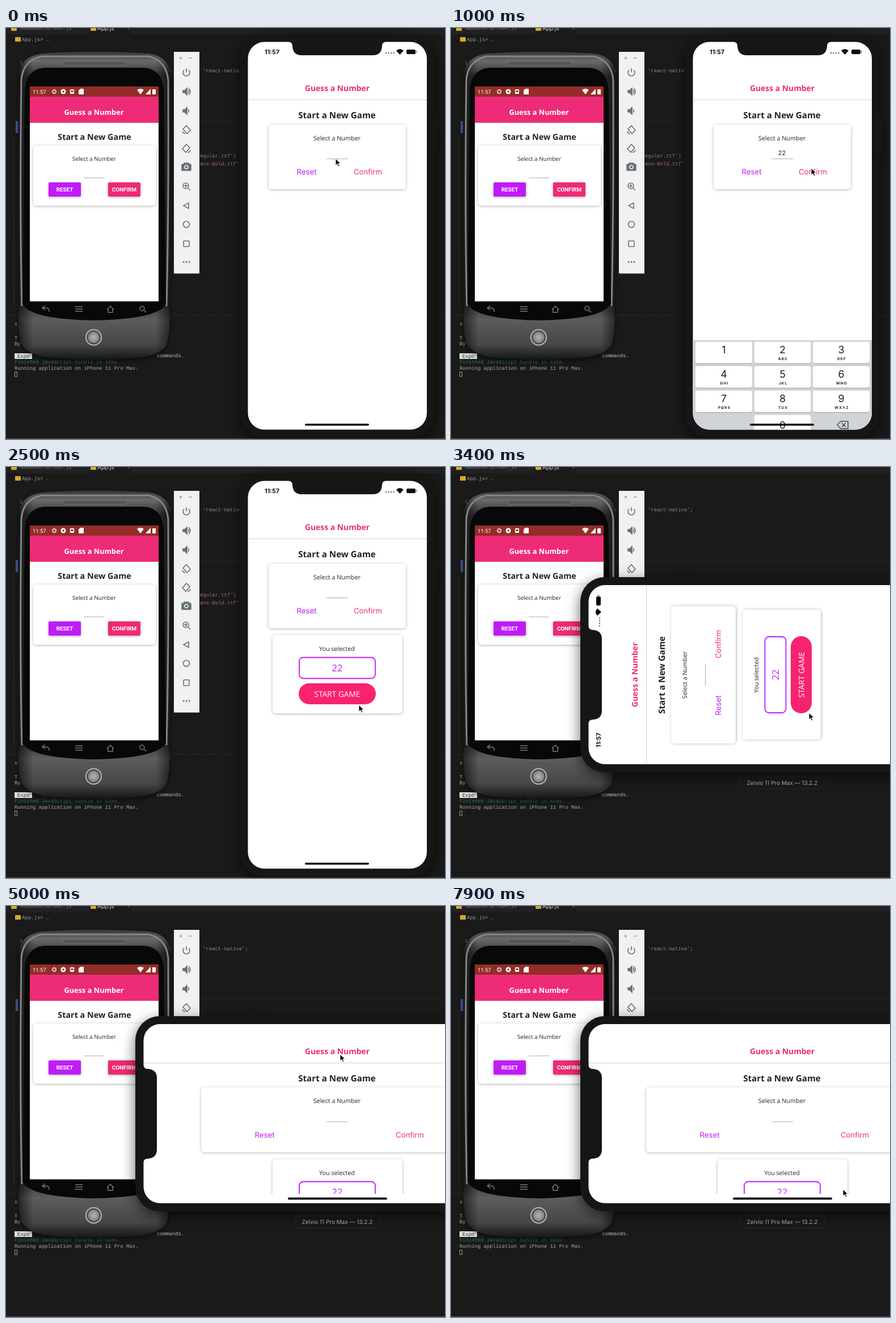
Recreate the animation shown at these times as an HTML page. Size 774 px wide and 724 px high, loop 8000 ms.

```html
<!DOCTYPE html>
<html lang="en">
<head>
<meta charset="utf-8">
<title>Guess a Number</title>
<style>
html, body { margin: 0; width: 100%; height: 100%; overflow: hidden; background: #1a1a1a; }
svg { display: block; width: 774px; height: 724px; }
text { font-family: 'Open Sans', sans-serif; white-space: pre; text-rendering: geometricPrecision; }
.ui { font-family: Inter, sans-serif; }
.rb { font-family: Roboto, sans-serif; }
.mono { font-family: 'Liberation Mono', monospace; }
.b { font-weight: 700; }
.icon { fill: none; stroke: #66727a; stroke-width: 1.6; }
</style>
</head>
<body>
<svg id="stage" viewBox="0 0 774 724"></svg>
<script>
const PINK = '#ee2b76', HOT = '#f7246f', PURPLE = '#c01cf8', INK = '#222';
const CX = 584, CY = 366, LOOP = 8000;

const text = (x, y, size, fill, str, cls = '', anchor = 'middle') =>
  `<text x="${x}" y="${y}" font-size="${size}" fill="${fill}" class="${cls}" text-anchor="${anchor}">${str}</text>`;
const code = (x, y, fill, str, size = 8.9) => text(x, y, size, fill, str, 'mono', 'start');
const rect = (x, y, w, h, fill, r = 0, more = '') =>
  `<rect x="${x}" y="${y}" width="${w}" height="${h}" rx="${r}" fill="${fill}" ${more}/>`;
const path = (d, more = '') => `<path d="${d}" ${more}/>`;
const icon = (y, d) => `<g transform="translate(318 ${y})" class="icon">${d}</g>`;
const card = (x, y, w, h) => rect(x, y, w, h, '#fff', 6, 'filter="url(#cardShadow)"');

const defs = `<defs>
  <linearGradient id="body" x2="0" y2="1">
    <stop offset="0" stop-color="#333"/><stop offset=".03" stop-color="#6a6a6a"/>
    <stop offset=".08" stop-color="#303030"/><stop offset=".82" stop-color="#3a3a3a"/>
    <stop offset=".87" stop-color="#5c5c5c"/><stop offset=".95" stop-color="#474747"/>
    <stop offset="1" stop-color="#151515"/>
  </linearGradient>
  <linearGradient id="edges">
    <stop offset="0" stop-opacity=".6"/><stop offset=".1" stop-opacity="0"/>
    <stop offset=".9" stop-opacity="0"/><stop offset="1" stop-opacity=".6"/>
  </linearGradient>
  <radialGradient id="home"><stop offset="0" stop-color="#b5b5b5"/><stop offset=".65" stop-color="#858585"/>
    <stop offset=".75" stop-color="#333"/><stop offset="1" stop-color="#ddd"/></radialGradient>
  <filter id="cardShadow" x="-10%" y="-15%" width="120%" height="130%">
    <feDropShadow dx="0" dy="1" stdDeviation="2.4" flood-opacity=".3"/></filter>
  <filter id="phoneShadow" x="-10%" y="-10%" width="120%" height="120%">
    <feDropShadow dx="0" dy="3" stdDeviation="4" flood-opacity=".6"/></filter>
  <filter id="deviceShadow" filterUnits="userSpaceOnUse" x="150" y="-80" width="900" height="900">
    <feDropShadow dx="0" dy="7" stdDeviation="12" flood-opacity=".6"/></filter>
  <clipPath id="screen"><rect x="426.500" y="24.500" width="315.500" height="683" rx="29"/></clipPath>
  <clipPath id="safeArea"><rect x="244" y="277" width="682" height="230"/></clipPath>
</defs>`;

function editor() {
  const tab = (x, y) => rect(x, y, 10, 8, '#d5a72c', 1);
  return rect(0, 0, 774, 724, '#1a1a1a') + rect(0, 0, 774, 11, '#212122') + rect(146, 0, 74, 11, '#1b1b1b')
    + tab(9, -3) + code(25, 3, '#777', 'GameOverScreen.js') + tab(149, -3)
    + text(161, 4, 10, '#d5d5d5', 'App.js', 'ui', 'start') + text(216, 4, 10, '#777', '×')
    + tab(16, 16) + code(28, 23, '#999', 'App.js&gt; …') + code(24, 64, '#777', '1')
    + code(286, 78, '#4e9d83', 'y') + code(347, 78, '#a38586', "'react-native';")
    + code(342, 228, '#a46d76', "egular.ttf')") + code(342, 242, '#a46d76', "ans-Bold.ttf'")
    + rect(17, 164, 7, 21, '#455ca0') + path('M291 165H774', 'stroke="#242424"')
    + path('M14 190V490', 'stroke="#2a2a2a"') + path('M0 506H774', 'stroke="#343434" stroke-dasharray="2 2"')
    + code(15, 524, '#aaa', 's') + code(15, 549, '#aaa', 'T') + code(15, 559, '#aaa', 'By')
    + rect(15, 573, 31, 10, '#ddd') + code(20, 581, '#333', 'Expo') + code(266, 580, '#bbb', 'commands.')
    + code(15, 591, '#277a58', 'Finished JavaScript bundle in 62ms.')
    + code(15, 602, '#aaa', 'Running application on iPhone 11 Pro Max.')
    + rect(15.5, 606, 4, 8, 'none', 0, 'stroke="#999"') + rect(0, 723, 774, 1, '#555');
}

function androidPhone() {
  const outline = 'M22 88Q23 51 62 45Q155 38 254 45Q290 51 291 88Q292 350 287 490Q291 525 283 558Q275 574 240 580Q155 589 70 580Q36 574 27 555Q20 525 24 490Q20 300 22 88Z';
  const button = (x, fill, label) => rect(x, 272, 57, 25, fill, 2, 'filter="url(#cardShadow)"')
    + text(x + 28.5, 288, 9.8, '#fff', label, 'rb b');
  return path(outline, 'fill="url(#body)" filter="url(#phoneShadow)"') + path(outline, 'fill="url(#edges)"')
    + path('M27 92Q29 58 62 50H252Q283 58 286 92M27 92Q24 330 28 490M286 92Q287 330 283 490', 'fill="none" stroke="#858585" stroke-width="3"')
    + rect(100, 59, 112, 7, '#555', 3, 'stroke="#777"')
    + path('M33 112Q34 73 68 70H244Q277 73 278 112L282 486Q268 513 155 515Q42 513 29 486Z', 'fill="#080808"')
    + rect(42, 103, 227, 378.5, '#fff') + rect(42, 103, 227, 18, '#942d29') + rect(42, 121, 227, 46, PINK)
    + text(47, 116, 9.5, '#fff', '11:57', 'rb', 'start')
    + `<circle cx="85" cy="112" r="3" fill="none" stroke="#fff" stroke-width="2.4" stroke-dasharray="1.5 .8"/>
       <circle cx="101" cy="112" r="4.5" fill="#fff"/><circle cx="101" cy="112" r="1.7" fill="#942d29"/>`
    + rect(113, 108, 7, 8, '#fff', 1) + rect(114.5, 110, 4, 3, '#942d29') + path('M128 110L131 107H137V117H128Z', 'fill="#fff"')
    + path('M231 109Q237 105 243 109L237 117ZM246 117L255 107V117Z', 'fill="#fff"') + rect(258, 108, 6, 9, '#fff', 1)
    + text(155, 152.5, 12.8, '#fff', 'Guess a Number', 'b') + text(156, 197, 14.4, INK, 'Start a New Game', 'b')
    + card(48, 207, 216, 106) + text(155.5, 234, 10, INK, 'Select a Number') + path('M137 264H173', 'stroke="#aaa"')
    + button(75, PURPLE, 'RESET') + button(180, PINK, 'CONFIRM')
    + `<g fill="none" stroke="#777" stroke-width="1.5">`
    + path('M76 500Q78 493 69 493H65M69 489L64 493L69 497M122 491H135M122 495H135M122 499H135M178 496L184 490L190 496M180 495V501H188V495M243 497L247 501')
    + `<circle cx="240" cy="494" r="4"/></g><circle cx="154.500" cy="545" r="14.500" fill="url(#home)"/>`;
}

function toolbar() {
  const speaker = path('M-6 -2H-3L1 -6V6L-3 2H-6Z', 'fill="#66727a"');
  const turn = path('M-6 -1L0 -7L7 1L1 7ZM-7 3Q-6 7 -2 7');
  return rect(296, 42, 45, 390.5, '#f1f1f1')
    + path('M306 51L310 55M310 51L306 55M322 53H328', 'stroke="#777"')
    + icon(78, path('M-4 -4A6 6 0 1 0 4 -4M0 -7V0'))
    + icon(112, speaker + path('M3 -3Q6 0 3 3M4 -6Q10 0 4 6')) + icon(146, speaker + path('M3 -3Q6 0 3 3'))
    + icon(179, turn) + icon(212, `<g transform="scale(-1 1)">${turn}</g>`)
    + icon(245, rect(-8, -5, 16, 11, '#66727a', 1) + rect(-4, -7, 8, 3, '#66727a') + '<circle r="3" fill="#66727a" stroke="#eee"/>')
    + icon(279, '<circle cx="-1" cy="-1" r="5"/>' + path('M3 3L7 7M-4 -1H2M-1 -4V2'))
    + icon(313, path('M4 -5V5L-5 0Z')) + icon(346, '<circle r="5.500"/>') + icon(380, rect(-5, -5, 10, 10, 'none', 1))
    + icon(412, '<g fill="#66727a" stroke="none"><circle cx="-5" r="1.500"/><circle r="1.500"/><circle cx="5" r="1.500"/></g>');
}

// Shared by both orientations: dx spreads the buttons, the rest follows the card's top edge.
function entryCard(cardX, cardW, top, dx, numberId) {
  return card(cardX, top, cardW, 114) + text(583.5, top + 27.5, 10.8, INK, 'Select a Number')
    + text(583.5, top + 54, 11, INK, '', 'ui').replace('<text', `<text id="${numberId}"`)
    + path(`M565 ${top + 60.5}H603`, 'stroke="#aaa"')
    + text(CX - 54 - dx, top + 88, 13.2, PURPLE, 'Reset', 'ui') + text(CX + 54 + dx, top + 88, 13.2, PINK, 'Confirm', 'ui');
}

const selectedCard = top => card(470, top, 229, 138) + text(583.5, top + 28, 10.7, INK, 'You selected')
  + rect(517, top + 39.5, 134, 37, '#fff', 7, `stroke="${PURPLE}" stroke-width="1.8"`)
  + text(584, top + 64, 16.5, PURPLE, '22')
  + rect(516, top + 85, 136, 37, HOT, 18.5) + text(584, top + 109, 13.7, '#fff', 'START GAME');

const heading = (left, width, y) => text(584, y, 13.9, PINK, 'Guess a Number', 'b')
  + rect(left, y + 15, width, 1, '#d2d2d2') + text(583.5, y + 47.5, 15.2, INK, 'Start a New Game', 'b');

function keyboard() {
  const letters = ['', 'ABC', 'DEF', 'GHI', 'JKL', 'MNO', 'PQRS', 'TUV', 'WXYZ'];
  const key = (x, y, digit, sub) => rect(x, y + 1, 100, 38, '#999ca1', 4) + rect(x, y, 100, 38, '#fff', 4)
    + text(x + 50, y + (digit ? 20 : 24), 18, INK, digit, 'ui')
    + text(x + 51, y + 32, 6.5, INK, sub, 'ui b" letter-spacing="1.2');
  return rect(426, 486, 316, 222, '#d0d3d9')
    + letters.map((s, i) => key(431 + i % 3 * 103.5, 489 + Math.floor(i / 3) * 43, i + 1, s)).join('')
    + key(534.5, 618, 0, '')
    + path('M681 635L687 629H700V642H687ZM689 632L696 639M696 632L689 639', 'fill="none" stroke="#333" stroke-width="1.3"');
}

const portrait = text(456, 46, 10.8, '#111', '11:57', 'ui b', 'start')
  + path('M669 44H685', 'stroke="#555" stroke-width="2" stroke-dasharray="2 2.500"')
  + path('M688 40Q694.500 34 701 40L694.500 47Z', 'fill="#111"') + rect(706, 38, 16, 8, '#111', 2) + rect(723, 40, 1.5, 4, '#777')
  + heading(426, 316, 111) + entryCard(463, 242, 170, 0, 'entry')
  + `<g id="selected">${selectedCard(296)}</g><g id="keys">${keyboard()}</g>`
  + rect(527, 697, 113, 3.5, '#000', 2);

const landscape = heading(243, 684, 261)
  + `<g clip-path="url(#safeArea)">${entryCard(344, 480, 319.5, 74, 'entryWide')}${selectedCard(446)}</g>`
  + rect(497, 513.5, 175, 3.8, '#000', 2);

const device = `<g filter="url(#deviceShadow)"><g id="device">
  ${rect(754, 152, 6, 73, '#141414', 2)}${rect(412, 10, 344, 712, '#141414', 43)}
  <g clip-path="url(#screen)">${rect(426, 24, 316, 684, '#fff')}
    <g id="portrait">${portrait}</g><g id="landscape">${landscape}</g></g>
  ${path('M498 24Q505 25 505 32Q506 48 521 48H647Q662 48 663 32Q663 25 670 24Z', 'fill="#141414"')}
</g></g>`;

const label = `<g id="label">${rect(511, 546, 147, 21, '#1a1a1a', 2, 'stroke="#292929"')}
  ${text(584, 560, 10, '#b5b5b5', 'Zelvio 11 Pro Max — 13.2.2', 'ui')}</g>`;
const pointer = path('M0 0V12L3 9.500L5 14L7 13L5 8.700H9Z', 'id="pointer" fill="#111" stroke="#fff" stroke-width=".9"');

document.getElementById('stage').innerHTML =
  defs + editor() + androidPhone() + toolbar() + label + device + pointer;

const el = id => document.getElementById(id);
const set = (id, name, value) => el(id).setAttribute(name, value);
const show = (id, on) => set(id, 'display', on ? 'inline' : 'none');
const ease = (t, from, to) => {
  const u = Math.min(1, Math.max(0, (t - from) / (to - from)));
  return u * u * (3 - 2 * u);
};

// Pointer moves: start time, end time, x, y
const stops = [
  [0, 0, 581, 230], [350, 850, 635, 247], [1700, 2300, 622, 419], [2600, 3100, 631, 433],
  [4100, 4800, 589, 261], [5500, 6500, 232, 271], [6900, 7700, 691, 499]
];

function pointerAt(t) {
  let [, , x, y] = stops[0];
  for (const [from, to, nx, ny] of stops.slice(1)) {
    const k = ease(t, from, to);
    x += (nx - x) * k;
    y += (ny - y) * k;
  }
  return `translate(${x} ${y})`;
}

function draw(t) {
  const confirmed = t >= 1600;
  const raised = ease(t, 100, 400) - ease(t, 876, 1226);
  const turn = ease(t, 2900, 3300), content = ease(t, 3500, 3900);
  el('entry').textContent = confirmed || t < 500 ? '' : t < 600 ? '2' : '22';
  show('selected', confirmed);
  show('keys', raised > 0);
  set('keys', 'transform', `translate(0 ${222 * (1 - raised)})`);
  set('device', 'transform', `rotate(${-90 * turn} ${CX} ${CY})`);
  for (const id of ['portrait', 'landscape']) set(id, 'transform', `rotate(${90 * content} ${CX} ${CY})`);
  set('portrait', 'opacity', 1 - content);
  set('landscape', 'opacity', content);
  show('landscape', content > 0);
  show('label', turn === 1);
  set('pointer', 'transform', pointerAt(t));
}

const start = performance.now();
function frame(now) {
  const t = Math.max(0, now - start) % LOOP;
  draw(Math.floor(t / 100) * 100);
  requestAnimationFrame(frame);
}
draw(0);
requestAnimationFrame(frame);
</script>
</body>
</html>
```
